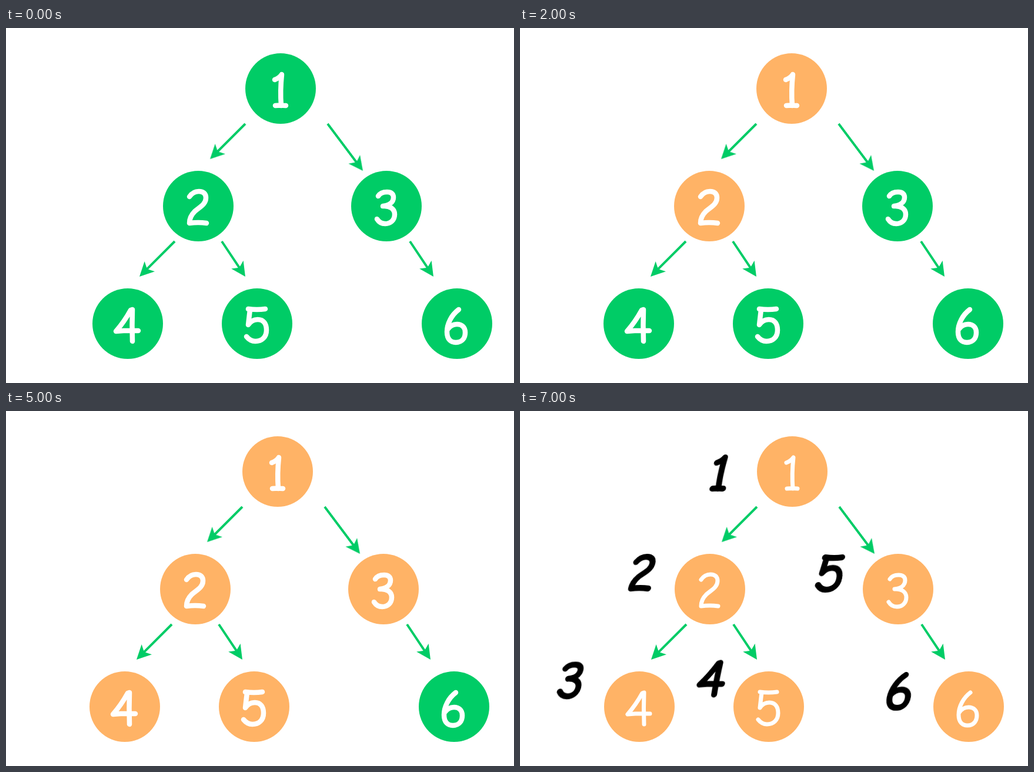
An HTML page for the animation above (8000 ms loop, 864 px wide and 604 px high).

```html
<!DOCTYPE html>
<html lang="en">
<head>
<meta charset="utf-8">
<title>Preorder traversal</title>
<style>
  html, body { margin: 0; width: 100%; height: 100%; overflow: hidden; background: #fff; }
  svg { display: block; width: 864px; height: 604px; }
  .digit { fill: none; stroke: #fff; stroke-width: 8.5; stroke-linecap: round; stroke-linejoin: round; }
  .order .digit { stroke: #000; stroke-width: 10; }
</style>
</head>
<body>
<svg viewBox="0 0 864 604" role="img" aria-label="Binary tree with nodes 1 to 6, visited in the order 1, 2, 4, 5, 3, 6">
  <g id="tree"></g>
  <g id="order" class="order"></g>
</svg>
<script>
const GREEN = '#00cc66', ORANGE = '#ffb366';
const STEP = 1000, STEPS = 8;

// Handwritten digits as pen strokes, centred on their node
const DIGITS = {
  1: 'M-10-15Q-2-18 2-24Q-1 4 1 29M-9 29Q0 28 9 29',
  2: 'M-15-16C-11-22-5-25 1-25C9-25 13-21 13-14C13-3 2 2-6 9C-12 15-15 22-15 29Q0 27 14 29',
  3: 'M-14-17C-11-22-5-24 1-24C8-24 12-21 12-15C12-6 4-1-6 0C6-1 14 5 14 14C14 24 7 30-2 30C-8 30-13 27-16 22',
  4: 'M8 30Q7 2 8-24L5-23Q-6-3-20 13Q0 11 18 12',
  5: 'M14-25Q0-23-15-25L-12-24L-15 2C-11-4-5-7 1-7C11-7 16 0 16 11C16 23 8 30-3 30C-10 30-14 27-18 22',
  6: 'M3-24C-9-15-17 0-17 14C-17 27-10 32-2 32C9 32 14 24 14 15C14 6 8 1 0 1C-7 1-12 4-16 10'
};

// value, x, y, step at which the node is visited
const NODES = [
  [1, 467, 103, 1], [2, 327, 303, 2], [3, 647, 303, 5],
  [4, 207, 503, 3], [5, 427, 503, 4], [6, 767, 503, 6]
];
const ARROWS = [
  [407, 163, 347, 223], [547, 163, 607, 243], [287, 363, 227, 423],
  [367, 363, 407, 423], [687, 363, 727, 423]
];
// rank, x, y
const RANKS = [
  [1, 342, 103], [2, 209.5, 273], [3, 88, 455.5],
  [4, 328, 452.5], [5, 529, 274], [6, 648.5, 473]
];

const tree = document.getElementById('tree');
const order = document.getElementById('order');

function add(parent, tag, attrs) {
  const el = document.createElementNS('http://www.w3.org/2000/svg', tag);
  for (const key in attrs) el.setAttribute(key, attrs[key]);
  return parent.appendChild(el);
}

// Hard switches of one property: changes = [[step, value], ...]
function switchAt(el, prop, changes) {
  const frames = changes.map(([step, value]) =>
    ({ [prop]: value, offset: step / STEPS, easing: 'step-end' }));
  frames.push({ [prop]: changes.at(-1)[1], offset: 1 });
  el.animate(frames, { duration: STEP * STEPS, iterations: Infinity });
}

function addDigit(parent, value, transform) {
  return add(parent, 'path', { class: 'digit', d: DIGITS[value], transform });
}

function addArrow([x1, y1, x2, y2]) {
  const length = Math.hypot(x2 - x1, y2 - y1);
  const angle = Math.atan2(y2 - y1, x2 - x1) * 180 / Math.PI;
  const g = add(tree, 'g', { transform: `translate(${x2} ${y2}) rotate(${angle})` });
  add(g, 'path', { d: `M${-length} 0H-16`, stroke: GREEN, 'stroke-width': 4 });
  add(g, 'path', { d: 'M0 0L-24.5 12.3L-18.4 0L-24.5-12.3Z', fill: GREEN });
}

ARROWS.forEach(addArrow);

for (const [value, x, y, visit] of NODES) {
  const circle = add(tree, 'circle', { cx: x, cy: y, r: 60, fill: GREEN });
  switchAt(circle, 'fill', [[0, GREEN], [visit, ORANGE]]);
  const digit = addDigit(tree, value, `translate(${x} ${y})`);
  switchAt(digit, 'strokeWidth', [[0, '8.5px'], [7, '7px']]);
}

for (const [value, x, y] of RANKS) {
  addDigit(order, value, `translate(${x} ${y}) skewX(-11)`);
}

switchAt(tree, 'transform', [[0, 'translate(0px)'], [1, 'translate(-5px)'], [7, 'translate(-4px)']]);
switchAt(order, 'opacity', [[0, 0], [7, 1]]);
</script>
</body>
</html>
```
